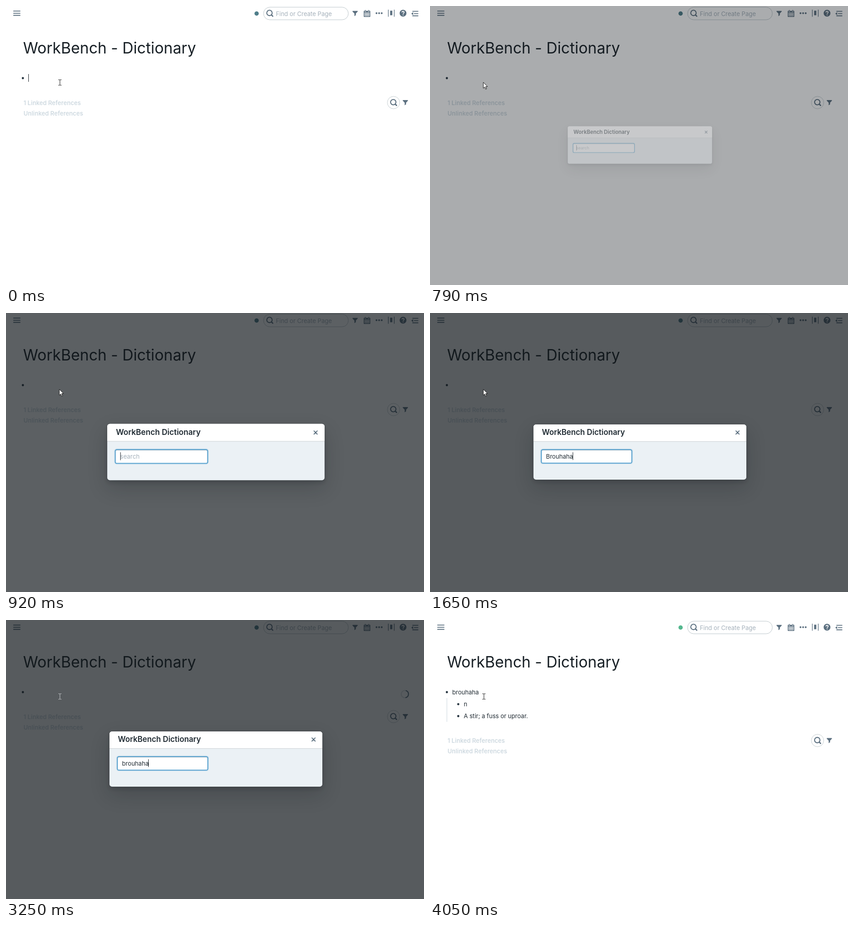
Write an HTML page that moves like this. It is 917x611 px and loops after 5240 ms.

```html
<!DOCTYPE html>
<html lang="en">
<head>
<meta charset="utf-8">
<title>Dictionary</title>
<style>
html, body { margin: 0; width: 100%; height: 100%; overflow: hidden; background: #fff; }
body { position: relative; font: 13.08px/20px Inter, sans-serif; color: #202b33; }
div, svg, span.t { position: absolute; }
.t { white-space: pre; }
#page, #refs, #overlay { left: 0; top: 0; width: 917px; height: 611px; }
svg.full { left: 0; top: 0; width: 917px; height: 611px; overflow: visible; }
h1 { position: absolute; margin: 0; left: 37.4px; top: 72px; font-size: 33.6px; line-height: 40px; font-weight: 400; white-space: pre; color: #182026; }
.ref { color: #ced9e0; font-weight: 600; left: 38.5px; }
.hint { color: #a5b1bb; }
.caret { width: 1px; height: 17px; background: #182026; }
#overlay { background: rgb(16, 22, 26); }
#dialog {
  left: 226.9px; top: 243.8px; width: 466.9px; height: 121px; border-radius: 5.6px; background: #ebf1f5;
  box-shadow: 0 0 0 1px rgba(16,22,26,.1), 0 4px 8px rgba(16,22,26,.2), 0 17px 43px rgba(16,22,26,.2);
}
#head { left: 0; top: 0; width: 100%; height: 37.3px; background: #fff; border-radius: 5.6px 5.6px 0 0; box-shadow: 0 1px 0 rgba(16,22,26,.15); }
#head .t { left: 18.7px; top: 7.7px; font-size: 16.8px; font-weight: 600; }
#close { left: 443.4px; top: 13.5px; width: 9.4px; height: 9.4px; }
#field {
  left: 18.2px; top: 55.8px; width: 196.6px; height: 28px; border-radius: 2.8px; background: #fff;
  box-shadow: 0 0 0 1px #137cbd, 0 0 0 2.8px rgba(19,124,189,.3), inset 0 1px 1px rgba(16,22,26,.2);
}
#field .t { left: 9.5px; top: 4.2px; }
#field .caret { top: 5.4px; }
#menu {
  left: 245px; top: 327.5px; width: 174.3px; height: 106px; border-radius: 2.8px; background: #fff;
  box-shadow: 0 0 0 1px rgba(16,22,26,.1), 0 2px 4px rgba(16,22,26,.2), 0 7px 22px rgba(16,22,26,.2);
}
.item { left: 4.7px; width: 164.4px; height: 48.4px; border-radius: 2px; }
.item .t { left: 6.5px; }
.item.on { background: #137cbd; color: #fff; }
</style>
</head>
<body>
<div id="page">
  <svg class="full" fill="#5c7080" stroke="none">
    <defs>
      <path id="funnel" d="M.9 0H11.3Q12.4.6 11.6 1.5L7.7 5.8V9.2L4.6 11.4V5.8L.5 1.5Q-.2.6.9 0Z"/>
      <g id="lens" fill="none" stroke="#5c7080" stroke-width="2.1"><circle r="5.9"/><path d="M4.4 4.4L7.2 7.2" stroke-width="2.7" stroke-linecap="round"/></g>
      <circle id="bullet" r="2.4" fill="#293742"/>
    </defs>
    <path d="M16 10.2h15.5v1.8H16zM16 14.9h15.5v1.8H16zM16 19.6h15.5v1.8H16z"/>
    <circle id="dot" cx="549.8" cy="16.5" r="4.7"/>
    <rect x="565" y="2.6" width="186" height="27.6" rx="13.8" fill="#fff" stroke="#bcc6ca"/>
    <use href="#lens" x="578" y="15.2"/>
    <use href="#funnel" x="759.8" y="10.8"/>
    <g>
      <path fill-rule="evenodd" d="M785.8 10.5h12.4q1 0 1 1v11.4q0 1-1 1h-12.4q-1 0-1-1V11.5q0-1 1-1zM786.5 14.6v7.6h11v-7.6z"/>
      <path d="M787 8.5h2.3v4H787zM794.7 8.5h2.3v4h-2.3z" stroke="#fff" stroke-width=".6"/>
      <path d="M787.5 15.5h2.2v2.2h-2.2zM790.9 15.5h2.2v2.2h-2.2zM794.3 15.5h2.2v2.2h-2.2zM787.5 19h2.2v2.2h-2.2zM790.9 19h2.2v2.2h-2.2zM794.3 19h2.2v2.2h-2.2z"/>
    </g>
    <circle cx="812.8" cy="15.8" r="2"/><circle cx="818.5" cy="15.8" r="2"/><circle cx="824.2" cy="15.8" r="2"/>
    <path d="M838 8h1.3v15.5H838zM851 8h1.3v15.5H851zM842.7 10.3h4.8v10h-4.8z"/>
    <circle cx="871" cy="15.8" r="7.5"/>
    <path d="M868.6 14q.2-2.3 2.5-2.3 2.3.1 2.3 2.1 0 1.2-1.3 2-.9.6-.9 1.5" fill="none" stroke="#fff" stroke-width="1.7"/>
    <circle cx="871.2" cy="19.6" r="1.1" fill="#fff"/>
    <path d="M891.5 10.7h13v1.8h-13zM895 15.8h9.5v1.8H895zM891.5 20.6h13v1.8h-13zM889 16.7l4.3-3.3v6.6z"/>
    <use href="#bullet" x="37" y="158"/>
    <g id="spinner" fill="none" stroke-width="2">
      <circle r="8" stroke="#dde2e6"/>
      <path d="M2.7 -7.5A8 8 0 0 1 2 7.7" stroke="#5c7080" stroke-linecap="round"/>
    </g>
  </svg>
  <span class="t hint" style="left:592px;top:6.5px">Find or Create Page</span>
  <h1>WorkBench - Dictionary</h1>
  <div id="pageCaret" class="caret" style="left:49px;top:149px"></div>
  <div id="entry">
    <svg class="full">
      <rect x="36.4" y="171" width="1.3" height="52" fill="#d8dfe4"/>
      <use href="#bullet" x="62" y="184.3"/><use href="#bullet" x="62" y="210.5"/>
    </svg>
    <span class="t" style="left:48.7px;top:147.6px">brouhaha</span>
    <span class="t" style="left:74px;top:173.8px">n</span>
    <span class="t" style="left:74px;top:200.2px">A stir; a fuss or uproar.</span>
  </div>
  <div id="refs">
    <span class="t ref" style="top:201.8px">1 Linked References</span>
    <span class="t ref" style="top:224.6px">Unlinked References</span>
    <svg class="full" fill="#5c7080">
      <circle cx="850.2" cy="211.5" r="13.6" fill="none" stroke="#c4cdd0"/>
      <use href="#lens" x="849.6" y="210.6"/>
      <use href="#funnel" x="870" y="206"/>
    </svg>
  </div>
</div>
<div id="overlay"></div>
<div id="dialog">
  <div id="head">
    <span class="t">WorkBench Dictionary</span>
    <svg id="close" viewBox="0 0 10 10"><path d="M1.2 1.2l7.6 7.6M8.8 1.2L1.2 8.8" stroke="#5c7080" stroke-width="2" stroke-linecap="round"/></svg>
  </div>
  <div id="field"><span id="word" class="t"></span><div id="caret" class="caret"></div></div>
</div>
<div id="menu">
  <div class="item on" style="top:5px">
    <b class="t" style="position:absolute;font-weight:600;top:4.6px">brouhaha</b>
    <span class="t" style="top:24.2px"><i>n</i> A stir; a fuss or uproar.</span>
  </div>
  <div class="item" style="top:53.4px">
    <b class="t" style="position:absolute;font-weight:600;top:4.6px">brouhahas</b>
    <span class="t" style="top:24.2px"><i>n</i> A stir; a fuss or uproar.</span>
  </div>
</div>
<svg class="full">
  <path id="arrow" d="M117 167v13.2l3-2.8 2.1 4.8 2.1-.9-2.1-4.7h4.1z" fill="#fff" stroke="#111" stroke-width="1"/>
  <path id="beam" d="M115 161.5h2.5l.8.6.8-.6h2.5M118.3 162v11M115 173.5h2.5l.8-.6.8.6h2.5" fill="none"/>
</svg>
<script>
const LOOP = 5240;
const steps = [0, 390, 720, 790, 850, 920, 990, 1060, 1320, 1650, 2180, 2250, 2710, 2840, 2910, 3180, 3250, 3320, 3580, 3650, 4050];
const el = id => document.getElementById(id);
const show = (id, on) => { el(id).style.visibility = on ? 'visible' : 'hidden'; };
const clamp = x => Math.min(1, Math.max(0, x));

function bezier(x1, y1, x2, y2) {
  const at = (s, a, b) => 3 * (1 - s) ** 2 * s * a + 3 * (1 - s) * s * s * b + s ** 3;
  return x => {
    if (x <= 0 || x >= 1) return clamp(x);
    let lo = 0, hi = 1;
    for (let i = 0; i < 30; i++) {
      const mid = (lo + hi) / 2;
      if (at(mid, x1, x2) < x) lo = mid; else hi = mid;
    }
    return at(lo, y1, y2);
  };
}
const pop = bezier(.54, 1.12, .38, 1.11);
const fade = bezier(.4, 1, .75, .9);

const idle = [79, 126, 138], synced = [84, 183, 142];
const mix = k => 'rgb(' + idle.map((c, i) => Math.round(c + (synced[i] - c) * k)) + ')';

function draw(time) {
  const t = steps.filter(s => s <= time).pop();
  const open = t >= 720 && t < 3320;
  const typed = t < 1650 ? '' : t < 2840 ? 'Brouhaha' : 'brouhaha';
  const p = pop((t - 740) / 300);

  show('pageCaret', t < 390);
  show('entry', t >= 3320);
  el('refs').style.transform = t >= 3320 ? 'translateY(52.4px)' : '';

  el('overlay').style.opacity = open ? .7 * fade((t - 740) / 200) : 0;
  el('dialog').style.opacity = open ? clamp(p) : 0;
  el('dialog').style.transform = p === 1 ? '' : `scale(${.5 + p / 2})`;
  el('word').textContent = typed || 'search';
  el('word').className = typed ? 't' : 't hint';
  el('caret').style.left = (typed ? el('word').offsetWidth + 9.4 : 9.9) + 'px';
  show('caret', open && !(t >= 1320 && t < 1650) && !(t >= 2180 && t < 2710));
  el('menu').style.opacity = t < 2180 || t >= 2910 ? 0 : t < 2250 || t >= 2840 ? .5 : 1;

  show('spinner', t >= 3180 && t < 3320);
  el('spinner').setAttribute('transform', `translate(875 162.3) rotate(${(t - 3250) * .72})`);
  el('dot').setAttribute('fill', mix(t < 3580 ? 0 : t < 3650 ? .4 : t < 4050 ? .8 : 1));

  show('arrow', t >= 720 && t < 3250);
  show('beam', t < 720 || t >= 3250);
  el('beam').setAttribute('stroke', open ? '#c8cbcd' : '#111');
}

const start = performance.now();
function tick() {
  draw((performance.now() - start) % LOOP);
  requestAnimationFrame(tick);
}
draw(0);
requestAnimationFrame(tick);
</script>
</body>
</html>
```
